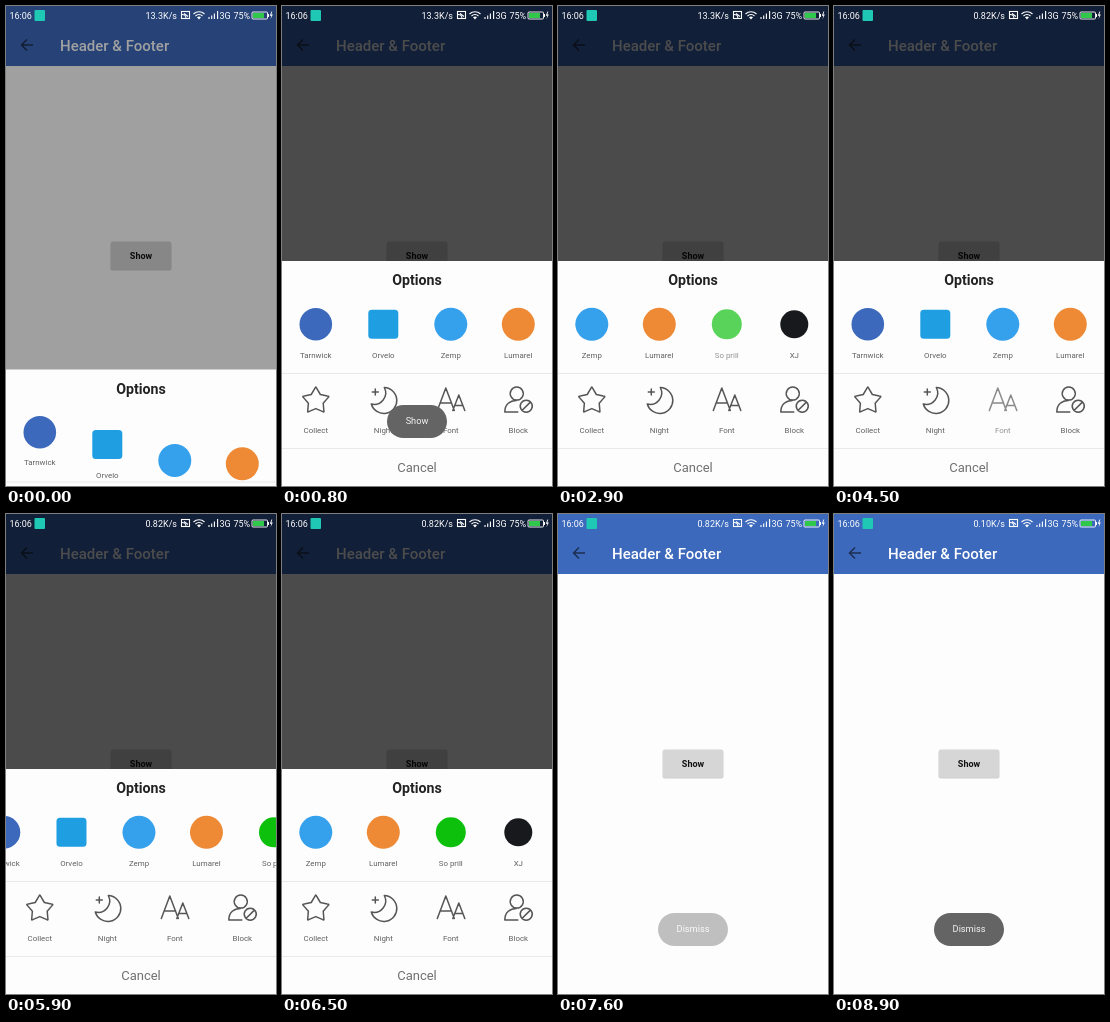
An HTML page for the animation above (9.1 s loop, 270x480 px).

```html
<!DOCTYPE html>
<html lang="en">
<head>
<meta charset="utf-8">
<title>Bottom sheet</title>
<style>
  html, body { margin: 0; width: 100%; height: 100%; overflow: hidden; background: #fdfdfd; }
  svg { display: block; width: 100vw; height: 100vh; font-family: Roboto, sans-serif; }
  .mid { text-anchor: middle; }
  .label { font-size: 7.9px; fill: #606060; text-anchor: middle; }
  .line { fill: none; stroke: #555; stroke-width: 1.5; stroke-linejoin: round; stroke-linecap: round; }
  .status { font-size: 9px; fill: #fff; }
  .thin { fill: none; stroke: #fff; stroke-width: 1.1; }
</style>
</head>
<body>
<svg viewBox="0 0 270 480">
  <defs>
    <clipPath id="clipTop"><rect y="290" width="270" height="77"/></clipPath>
    <clipPath id="clipBottom"><rect y="368" width="270" height="74"/></clipPath>
  </defs>

  <rect width="270" height="480" fill="#fdfdfd"/>
  <rect width="270" height="60" fill="#3c69bb"/>
  <path d="M27 39H16M21 33.5L15.5 39L21 44.5" fill="none" stroke="#1d2f52" stroke-width="1.5"/>
  <text x="54" y="45" font-size="15" font-weight="500" fill="#fff">Header &amp; Footer</text>
  <rect x="104.5" y="236" width="61" height="28.5" rx="2" fill="#000" opacity=".18"/>
  <rect x="105" y="235.500" width="60" height="28" rx="1.500" fill="#d6d6d6"/>
  <text class="mid" x="135" y="252.700" font-size="9" font-weight="700" fill="#111">Show</text>

  <rect id="dim" width="270" height="480"/>

  <g id="sheet">
    <rect y="255" width="270" height="226" fill="#fdfdfd"/>
    <text class="mid" x="135" y="279" font-size="14.200" font-weight="700" fill="#222">Options</text>
    <g clip-path="url(#clipTop)"><g id="apps"></g></g>
    <g clip-path="url(#clipBottom)"><g id="tools"></g></g>
    <path d="M0 367.500H270M0 442.500H270" stroke="#e9e9e9"/>
    <text class="mid" x="135" y="466.300" font-size="13" fill="#707070">Cancel</text>
  </g>

  <g id="toast">
    <rect id="toastBox" y="399" height="33" rx="16.500" fill="#646464"/>
    <text id="toastText" class="mid" x="135" y="418.300" font-size="9.200" fill="#f4f4f4"></text>
  </g>

  <g class="status">
    <text x="3.500" y="13">16:06</text>
    <rect x="28.500" y="4" width="10.500" height="11" rx="1" fill="#1fc8b5"/>
    <text id="speed" x="171" y="13" text-anchor="end"></text>
    <rect class="thin" x="175.500" y="5.500" width="8" height="7"/>
    <path class="thin" d="M176 8.500a4 4 0 0 1 4 4M178 7.500l4 3"/>
    <path class="thin" d="M187.500 8a8 8 0 0 1 11 0M189.500 10a5 5 0 0 1 7 0"/>
    <path d="M191 11.300a3 3 0 0 1 4 0L193 13.500Z" fill="#fff"/>
    <path class="thin" d="M203 13v-2M205.700 13v-3.500M208.400 13v-5.500M211.600 13v-8"/>
    <text x="213.500" y="13">3G</text>
    <text x="227.500" y="13">75%</text>
    <rect x="246" y="6" width="15.500" height="7" rx="1" fill="none" stroke="#fff" stroke-width=".9"/>
    <rect x="247" y="7" width="11" height="5" fill="#2fc84b"/>
    <path d="M262.500 8v3" stroke="#fff"/>
    <path d="M265.500 5.500l-1.700 4.200h1.500l-.8 3.500 2.300-4.700h-1.500l1-3Z" fill="#fff"/>
  </g>
</svg>
<script>
const LOOP = 9100, STEP = 100, GAP = 67.5;
const $ = id => document.getElementById(id);
const disc = (r, color) => `<circle r="${r}" fill="${color}"/>`;
const line = d => `<path class="line" d="${d}"/>`;

// Five-pointed star with rounded tips.
function starPath() {
  const at = (r, step) => {
    const a = Math.PI * (step / 5 - .5);
    return `${(r * Math.cos(a)).toFixed(2)} ${(r * Math.sin(a) + .8).toFixed(2)} `;
  };
  let d = '';
  for (let i = 0; i < 10; i += 2) {
    d += (i ? 'L' : 'M') + at(12.4, i - .12) + 'Q' + at(15, i) + at(12.4, i + .12) + 'L' + at(7.8, i + 1);
  }
  return d + 'Z';
}

const apps = [
  ['Tarnwick', disc(16.3, '#3c69bb')],
  ['Orvelo', '<rect x="-15" y="-14.500" width="30" height="29" rx="3.500" fill="#1f9fe2"/>'],
  ['Zemp', disc(16.5, '#35a0ec')],
  ['Lumarel', disc(16.5, '#ee8a35')],
  ['So prill', disc(15, '#0cc00c')],
  ['XJ', disc(14, '#17191c')]
];
const tools = [
  ['Collect', line(starPath())],
  ['Night', line('M1-12.500A13 13 0 1 1-12 4A11.500 11.500 0 0 0 1-12.500ZM-8-11V-5M-11-8H-5')],
  ['Font', line('M-13.500 10.500L-5-12L3.500 10.500M-10.800 3H.8M2 10.500L8-5L14 10.500M4 5.500H12')],
  ['Block', line('M-1.500-13a6.500 6.500 0 1 1-.1 0ZM-13.500 12C-13.500 4-8 .500-2 .500M-13.500 12H-.500'
    + 'M8 .200a6 6 0 1 1-.1 0ZM3.900 10.300L12.100 2.100')]
];

function fill(id, list, iconY, labelY) {
  $(id).innerHTML = list.map(([name, icon], i) =>
    `<g><g transform="translate(${33.8 + i * GAP} ${iconY})">${icon}</g>` +
    `<text class="label" x="${33.8 + i * GAP}" y="${labelY}">${name}</text></g>`).join('');
  return [...$(id).children];
}
const appItems = fill('apps', apps, 318.3, 351.6);
const toolItems = fill('tools', tools, 394, 426.6);

const linear = p => p;
const easeOut = p => 1 - (1 - p) ** 2;

// Interpolates a list of [time, value] keys.
function track(t, keys, ease = linear) {
  const next = keys.findIndex(k => k[0] > t);
  if (next === 0) return keys[0][1];
  if (next < 0) return keys[keys.length - 1][1];
  const [t0, a] = keys[next - 1], [t1, b] = keys[next];
  return a + (b - a) * ease((t - t0) / (t1 - t0));
}

const sheetKeys = [[0, 108.5], [100, 45], [200, 14], [300, 3], [400, 0],
  [7000, 0], [7100, 32], [7200, 97.5], [7300, 180], [7400, 227]];
const dimKeys = [[0, .37], [100, .55], [200, .66], [300, .7], [7000, .7], [7100, .55], [7200, .34], [7300, .14], [7400, 0]];
const scrollKeys = [[2050, 0], [2800, 135], [3000, 135], [3500, 0], [5800, 0], [6500, 135]];
const toastKeys = [[400, 0], [800, 1], [2000, 1], [2400, 0], [7400, 0], [7900, 1]];

// Staggered spring that lifts each column into place.
function spring(t, i) {
  const age = (t + 180 - 80 * i) / 1000;
  if (t >= 800) return 0;
  return age <= 0 ? 31 : 31 * Math.exp(-5 * age) * Math.cos(9 * age);
}

const shift = (el, x, y) => el.setAttribute('transform', `translate(${x.toFixed(2)} ${y.toFixed(2)})`);
const press = (el, t, from, to) => el.setAttribute('opacity', t >= from && t < to ? .68 : 1);

function render(t) {
  shift($('sheet'), 0, track(t, sheetKeys));
  shift($('apps'), -track(t, scrollKeys, easeOut), 0);
  for (const items of [appItems, toolItems]) items.forEach((el, i) => shift(el, 0, spring(t, i)));
  press(appItems[4], t, 2900, 3000);
  press(toolItems[2], t, 4500, 5000);
  $('dim').setAttribute('opacity', track(t, dimKeys));

  const opening = t < 5000, width = opening ? 60 : 70;
  $('toast').setAttribute('opacity', track(t, toastKeys));
  $('toastBox').setAttribute('x', 135 - width / 2);
  $('toastBox').setAttribute('width', width);
  $('toastText').textContent = opening ? 'Show' : 'Dismiss';
  $('speed').textContent = (t < 3900 ? '13.3' : t < 8900 ? '0.82' : '0.10') + 'K/s';
}

const start = performance.now();
function tick() {
  const t = (performance.now() - start) % LOOP;
  render(Math.floor(t / STEP) * STEP);
  requestAnimationFrame(tick);
}
tick();
</script>
</body>
</html>
```
